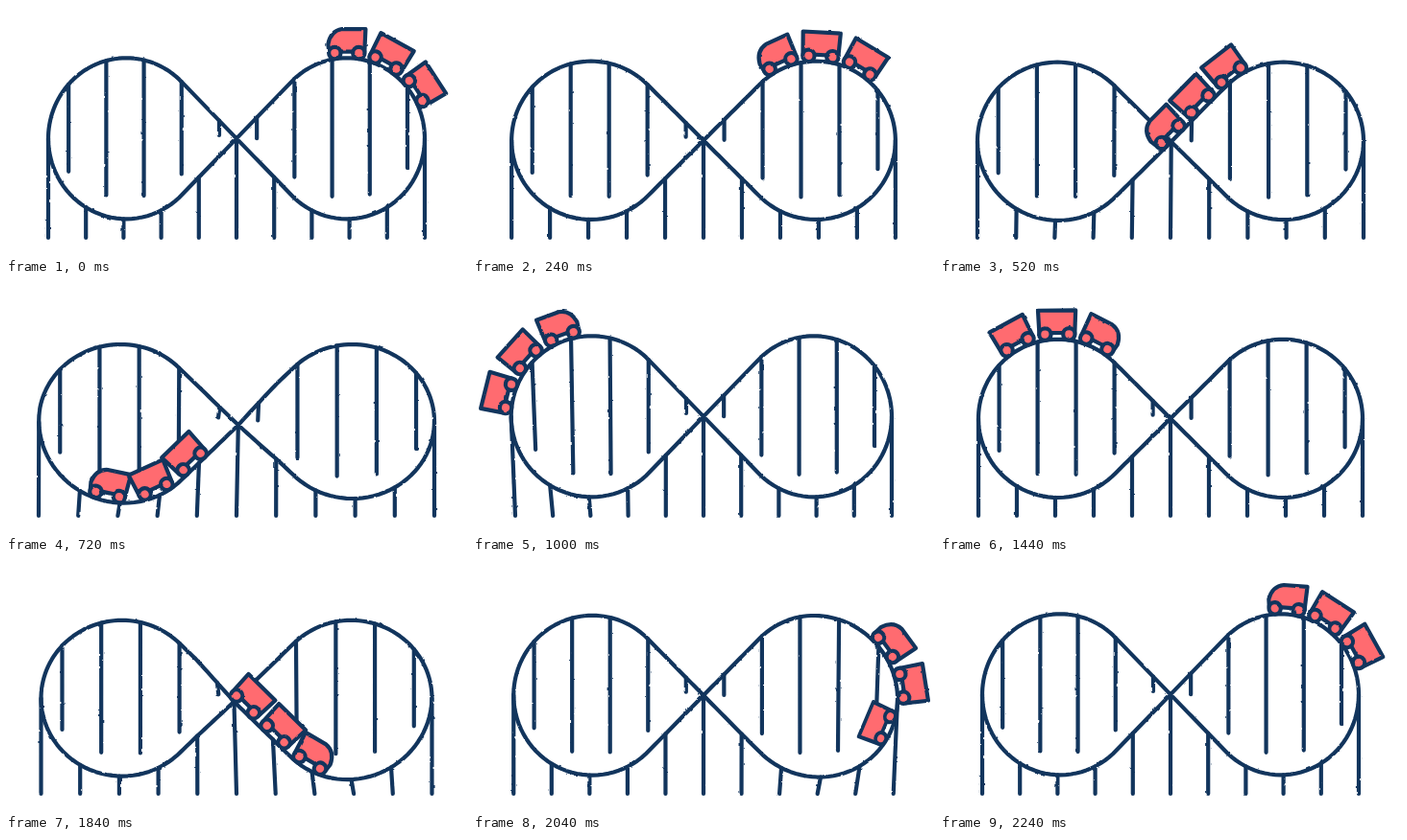
An HTML page that plays this animation: 480x261 px, repeating every 2280 ms.

```html
<!DOCTYPE html>
<html lang="en">
<head>
<meta charset="utf-8">
<title>Roller coaster</title>
<style>
  html, body { margin: 0; width: 100%; height: 100%; overflow: hidden; background: #fff; }
  svg { display: block; width: 100%; height: 100%; }
  g { stroke: #12355d; stroke-width: 4.2; stroke-linecap: round; stroke-linejoin: round; fill: #ff6b70; }
  #track, #posts { fill: none; }
</style>
</head>
<body>
<svg viewBox="0 0 480 261">
  <defs>
    <filter id="rough" filterUnits="userSpaceOnUse" x="0" y="0" width="480" height="261" color-interpolation-filters="sRGB">
      <feTurbulence type="fractalNoise" baseFrequency=".16" numOctaves="2" seed="4"/>
      <feDisplacementMap in="SourceGraphic" scale="2" xChannelSelector="R" yChannelSelector="G"/>
    </filter>
    <g id="wheels">
      <circle cx="-12.5" cy="-6" r="6.2"/>
      <circle cx="12.5" cy="-6" r="6.2"/>
    </g>
  </defs>
  <g filter="url(#rough)">
    <path id="posts"/>
    <path id="track"/>
    <g class="car"><path d="M-18.5-7.5L-19.6-31H5Q17-29 19.5-15L18.5-7.5Z"/><use href="#wheels"/></g>
    <g class="car"><path d="M-18.5-7.5L-19.6-31H19.6L18.5-7.5Z"/><use href="#wheels"/></g>
    <g class="car"><path d="M-18.5-7.5L-19.6-31H19.6L18.5-7.5Z"/><use href="#wheels"/></g>
  </g>
</svg>
<script>
const LOOP = 2280, STEP = 40, HALF = 1180, GROUND = 242, GAP = 44;
const R2 = Math.SQRT2, EDGE = 1 + R2, PI = Math.PI;
// Train lengths: outer arc, diagonal, inner arc, outer arc.
const OUT = 90, IN = 67, FLIP = PI * 170 / 180;
const A1 = OUT * PI / 4, A2 = A1 + 164, A3 = A2 + IN * (FLIP - PI / 4), LEN = A3 + OUT * (PI * 1.5 - FLIP);

// Keys: time, value, slope.
const TRAVEL = [[0, 0, .14], [260, 43, .2], [520, 148, .68], [720, 301, .88], [1000, LEN - 31.5, .27], [1133, LEN - 6.5, .15], [HALF, LEN, .14]];
const SQUASH = [[0, 0, .0015], [260, .4, .0006], [520, .5, .0008], [660, .75, .004], [720, 1, 0], [960, 0, 0], [HALF, 0, 0]];
const PUSH = [[0, 0, 0], [460, 0, 0], [520, 1.2, .03], [720, 5.5, 0], [1000, 4.3, -.02], [1130, 0, 0], [HALF, 0, 0]];
const TURN = [[0, -.7, 0], [520, -.7, 0], [720, -.45, .004], [1000, PI / 2, 0], [HALF, PI / 2, 0]];

const clamp = (v, lo, hi) => Math.min(hi, Math.max(lo, v));
const $ = id => document.getElementById(id);
const cars = document.querySelectorAll('.car');

function ease(keys, t) {
  let i = 1;
  while (i < keys.length - 1 && t > keys[i][0]) i++;
  const [t0, a, va] = keys[i - 1], [t1, b, vb] = keys[i];
  const d = t1 - t0, s = (t - t0) / d, q = 1 - s;
  return a + (b - a) * s * s * (3 - 2 * s) + d * s * q * (va * q - vb * s);
}

// Unit point on the figure eight, and which way the car's roof faces.
function rail(len) {
  len = (len + 2 * LEN) % (2 * LEN);
  const m = len < LEN ? 1 : -1, u = len % LEN;
  let x, y;
  if (u > A1 && u < A2) {
    y = ((u - A1) / 82 - 1) / R2;
    x = -y;
  } else {
    const a = u <= A1 ? -PI / 2 - u / OUT
      : u < A3 ? PI / 4 + (u - A2) / IN : FLIP + (u - A3) / OUT;
    x = Math.cos(a) + (u <= A1 ? R2 : -R2);
    y = Math.sin(a);
  }
  return { x: x * m, y, roof: m * clamp((u - A3) / 18, -1, 1) };
}

function lower(x) {
  x = Math.abs(x);
  return x < 1 / R2 ? x : Math.sqrt(Math.max(0, 1 - (x - R2) ** 2));
}

function draw(t) {
  const second = t >= HALF, side = second ? 1 : -1;
  let p = second ? t - HALF : t;
  if (second && p > 660) p = 660 + (p - 660) * 520 / 440;

  const k = ease(SQUASH, p), push = ease(PUSH, p), turn = ease(TURN, p);
  const sx = (196 + 10 * k) / EDGE, sy = 84 - 3.5 * k, cy = 138.3 + 5.2 * k;
  const dx = Math.sin(turn), dy = Math.cos(turn);
  const flat = (x, y) => [240 + sx * x, cy + sy * y];
  // The rail bulges outward under the train.
  const bend = (x, y) => {
    const [px, py] = flat(x, y), out = x * side;
    const w = push * clamp(((out - R2) * dx + y * dy + .6) / 1.6, 0, 1) * clamp(1 + 2 * out, 0, 1);
    return [px + side * dx * w, py + dy * w];
  };
  const at = len => { const r = rail(len); return bend(r.x, r.y); };

  let d = '';
  for (let i = 0; i < 240; i++) d += (i ? 'L' : 'M') + at(i * LEN / 120);
  $('track').setAttribute('d', d + 'Z');

  d = '';
  for (let i = -5; i <= 5; i++) {
    const x = i * EDGE / 5;
    d += `M${bend(x, lower(x))}L${flat(x, 0)[0]},${GROUND}`;
    if (i === 5) break;
    const h = (i + .54) * EDGE / 5, [bx, by] = flat(h, lower(h));
    d += `M${bend(h, -lower(h))}L${bx},${by - 22}`;
  }
  $('posts').setAttribute('d', d);

  const lead = ease(TRAVEL, p) + (second ? LEN : 0);
  cars.forEach((car, i) => {
    const len = lead - i * GAP, [ax, ay] = at(len - 12), [bx, by] = at(len + 12);
    const deg = Math.atan2(by - ay, bx - ax) * 180 / PI;
    car.setAttribute('transform',
      `translate(${(ax + bx) / 2} ${(ay + by) / 2}) rotate(${deg}) scale(1 ${rail(len).roof})`);
  });
}

const start = performance.now();
function tick() {
  const t = (performance.now() - start) % LOOP;
  draw(Math.floor(t / STEP) * STEP);
  requestAnimationFrame(tick);
}
tick();
</script>
</body>
</html>
```
